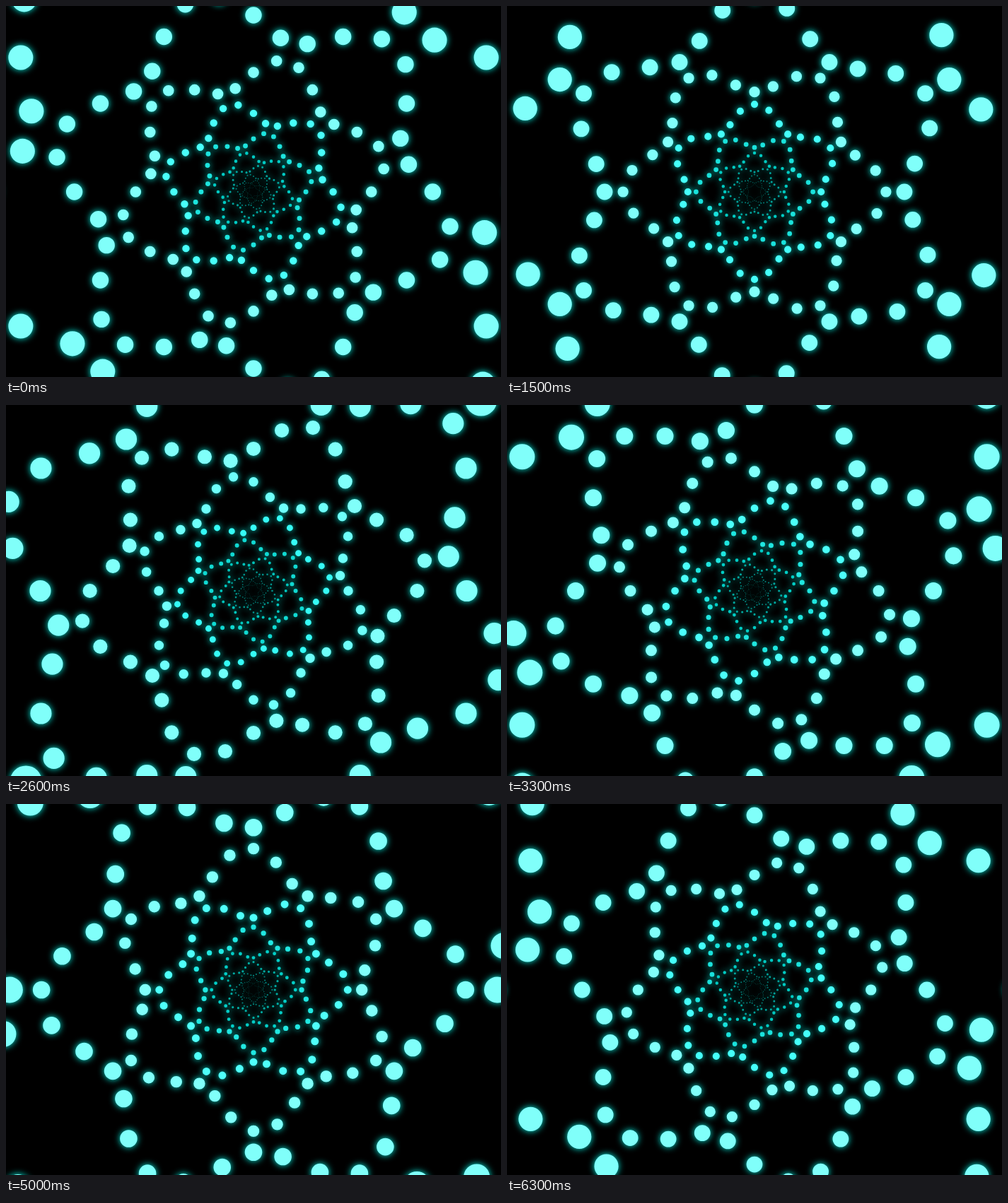
An HTML page with a canvas for the animation above (6.4 s loop, 700 by 525 pixels).

```html
<!DOCTYPE html>
<html lang="en">
<head>
<meta charset="utf-8">
<title>Rippling rings</title>
<style>
html, body { margin: 0; width: 100%; height: 100%; overflow: hidden; background: #000; }
canvas { display: block; }
</style>
</head>
<body>
<canvas id="stage" width="700" height="525"></canvas>
<script>
const ctx = document.getElementById('stage').getContext('2d');
const CENTER = { x: 350, y: 263 };
const STEP_MS = 100;
const STEPS = 64;
const SPOKES = 36;
const RATIO = 1.5;        // size of each ring against the next one in
const BASE = 251.7;       // radius of ring 0 at the start
const RIPPLE = 0.1365;    // wave height as a share of the radius
const DOT = 0.0465;       // dot radius as a share of the ring radius

const clamp = v => Math.max(0, Math.min(1, v));
const mix = (a, b, k) => Math.round(a + (b - a) * k);

// Dots turn from dim teal near the center to pale cyan further out.
function dotColor(radius) {
  const pale = clamp((radius - 50) / 110);
  const bright = clamp(radius / 100);
  const alpha = clamp(0.4 + radius / 70);
  return `rgba(${mix(0, 128, pale)},${mix(150, 255, bright)},${mix(140, 250, bright)},${alpha})`;
}

function drawRing(index, step) {
  const radius = BASE * RATIO ** (index + step / 16);
  const size = radius * DOT;
  const sign = index % 2 ? -1 : 1;
  const phase = Math.PI * (step + 0.5) / 32;
  ctx.beginPath();
  for (let i = 0; i < SPOKES; i++) {
    const angle = i * 2 * Math.PI / SPOKES;
    const r = radius * (1 + sign * RIPPLE * Math.sin(phase + 6 * angle));
    const x = CENTER.x + r * Math.cos(angle);
    const y = CENTER.y + r * Math.sin(angle);
    ctx.moveTo(x + size, y);
    ctx.arc(x, y, size, 0, 2 * Math.PI);
  }
  ctx.fillStyle = dotColor(radius);
  ctx.fill();
}

function draw(step) {
  const shift = Math.floor(step / 16);
  ctx.shadowColor = 'transparent';
  ctx.fillStyle = '#000';
  ctx.fillRect(0, 0, 700, 525);
  ctx.shadowColor = 'rgb(0,240,225)';
  ctx.shadowBlur = 10;
  for (let level = -9; level <= 2; level++) drawRing(level - shift, step);
}

const start = performance.now();
let shown = -1;
function tick() {
  const step = Math.floor((performance.now() - start) / STEP_MS) % STEPS;
  if (step !== shown) draw(shown = step);
  requestAnimationFrame(tick);
}
tick();
</script>
</body>
</html>
```
